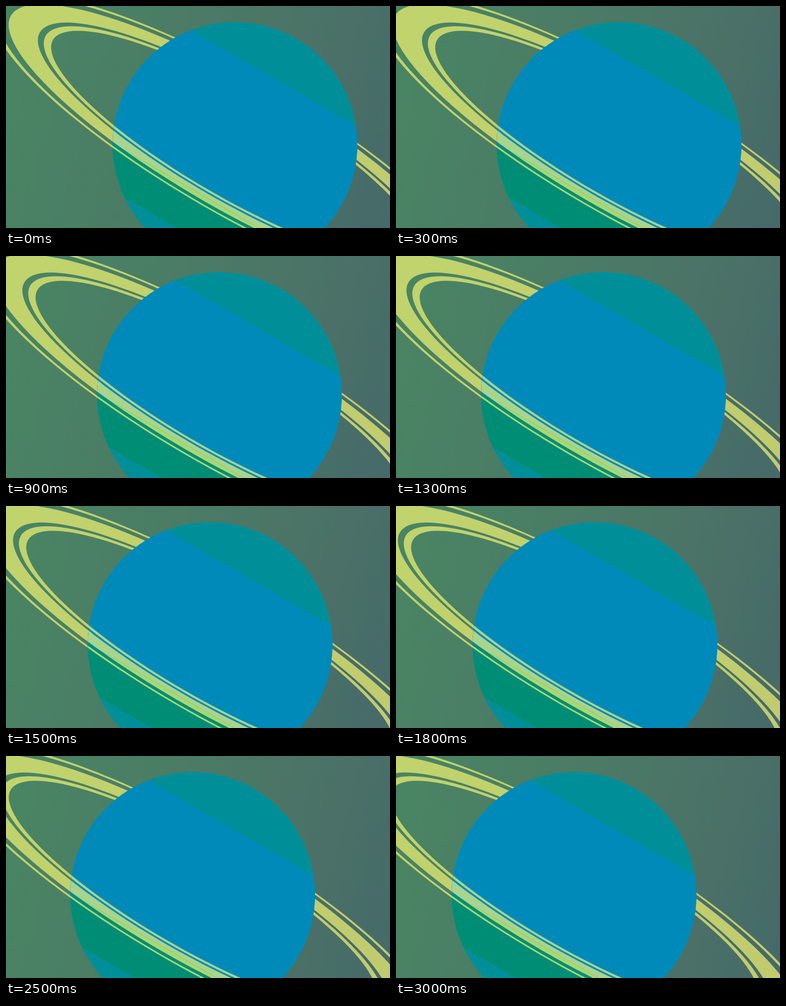
These frames come from a looping animation (717 by 414 pixels, 3100 ms). An HTML page with a canvas:

```html
<!DOCTYPE html>
<html lang="en">
<head>
<meta charset="utf-8">
<title>Ringed planet</title>
<style>
  html, body { margin: 0; overflow: hidden; }
  canvas { display: block; }
</style>
</head>
<body>
<canvas id="stage" width="717" height="414"></canvas>
<script>
const ctx = document.getElementById('stage').getContext('2d');
const LOOP = 3100, STEP = 100;
const RADIUS = 228.5, TILT = Math.PI / 6;
const RING_A = 392.4, RING_B = 96.8;
// Ring centre relative to the planet, along and across the tilt
const RING_X = 0.5, RING_Y = 0.9;
// Inner and outer scale of each ring
const RINGS = [[1, 1.04], [1.072, 1.231], [1.29, 1.321]];
// Upper edge and colour of each stripe, measured across the tilt
const STRIPES = [[-RADIUS, '#008f99'], [-143, '#008ab9'], [112, '#008d76'], [188.5, '#008f99']];
// Step number and leftward drift in pixels
const DRIFT = [[0, 0], [3, 11], [9, 29], [13, 40], [18, 56], [25, 79], [30, 95]];

function gradient(x0, y0, x1, y1, stops) {
  const g = ctx.createLinearGradient(x0, y0, x1, y1);
  stops.forEach(([at, color]) => g.addColorStop(at, color));
  return g;
}
const sky = gradient(0, 100, 740, 310,
  [[0, '#498563'], [0.45, '#4b7a66'], [0.75, '#4b7167'], [1, '#456a69']]);
const ringFill = gradient(-RING_A, 0, RING_A, 0, [[0, '#c1d36c'], [1, '#c1cb6e']]);

function driftAt(step) {
  const i = DRIFT.findIndex(([s], n) => n > 0 && step <= s);
  const [s0, d0] = DRIFT[i - 1], [s1, d1] = DRIFT[i];
  return d0 + (d1 - d0) * (step - s0) / (s1 - s0);
}

function drawRings(fill) {
  ctx.fillStyle = fill;
  for (const [inner, outer] of RINGS) {
    ctx.beginPath();
    for (const k of [inner, outer]) {
      ctx.ellipse(RING_X, RING_Y, RING_A * k, RING_B * k, 0, 0, 2 * Math.PI);
      ctx.closePath();
    }
    ctx.fill('evenodd');
  }
}

function drawFrontRings(top, bottom, color) {
  ctx.save();
  ctx.beginPath();
  ctx.rect(-RADIUS, top, 2 * RADIUS, bottom - top);
  ctx.clip();
  drawRings(color);
  ctx.restore();
}

function draw(time) {
  const step = Math.floor(time % LOOP / STEP);
  ctx.fillStyle = sky;
  ctx.fillRect(0, 0, 717, 414);

  ctx.save();
  ctx.translate(427.5 - driftAt(step), 258.5);
  ctx.rotate(TILT);
  drawRings(ringFill);

  ctx.beginPath();
  ctx.arc(0, 0, RADIUS, 0, 2 * Math.PI);
  ctx.clip();
  for (const [top, color] of STRIPES) {
    ctx.fillStyle = color;
    ctx.fillRect(-RADIUS - 1, top, 2 * RADIUS + 2, RADIUS - top + 1);
  }
  drawFrontRings(0, 112, '#a9d48b');
  drawFrontRings(112, RADIUS, '#a8d872');
  ctx.restore();
}

const start = performance.now();
function tick() {
  draw(performance.now() - start);
  requestAnimationFrame(tick);
}
tick();
</script>
</body>
</html>
```
